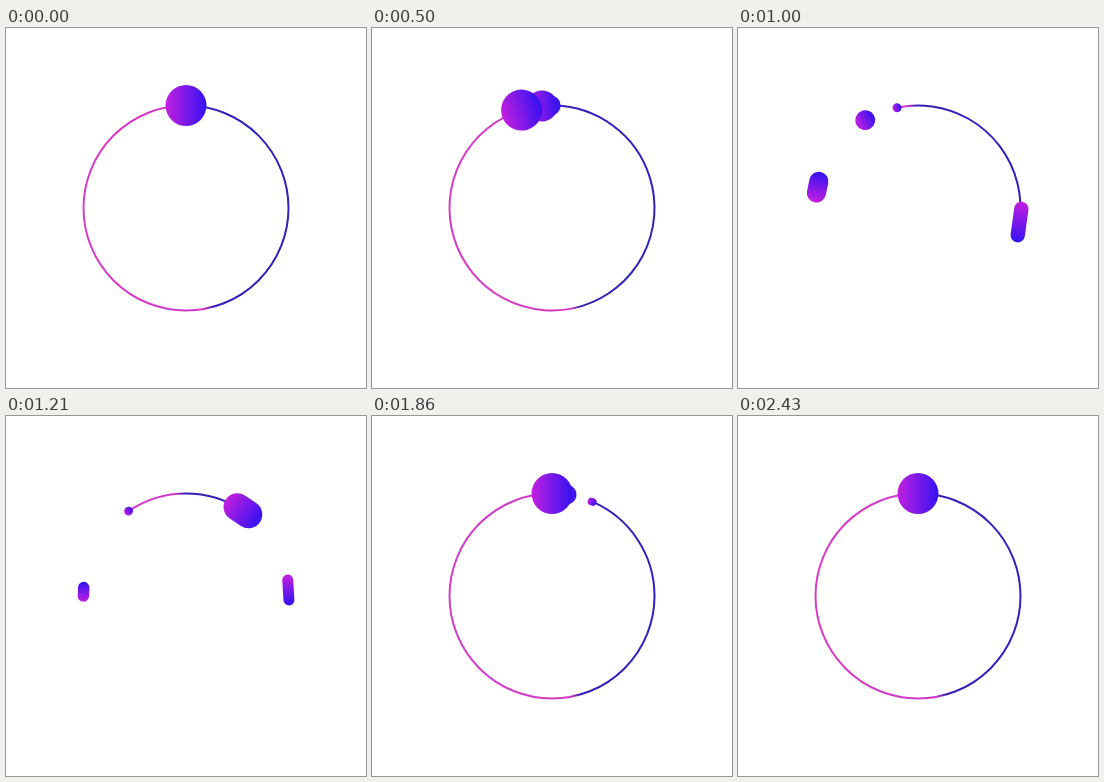
Recreate the animation shown at these times as an HTML page with a canvas. Size 360 by 360 pixels, loop 2.5 s.

```html
<!DOCTYPE html>
<html lang="en">
<head>
<meta charset="utf-8">
<title>Ring loader</title>
<style>
  html, body { margin: 0; width: 100%; height: 100%; overflow: hidden; background: #fff; }
  canvas { display: block; width: 100vw; height: 100vh; }
</style>
</head>
<body>
<canvas id="stage" width="360" height="360"></canvas>
<script>
const ctx = document.getElementById('stage').getContext('2d');
const LOOP = 2500, TRAVEL = 1850, STAGGER = 190;
const CENTER = 180, RADIUS = 102.5, TURN = Math.PI * 2;
const SIZES = [41, 31, 20, 9];

const ringPaint = ctx.createLinearGradient(90, 194.6, 290, 165.4);
ringPaint.addColorStop(0, '#d63cc6');
ringPaint.addColorStop(0.47, '#d038c8');
ringPaint.addColorStop(0.52, '#3420b4');
ringPaint.addColorStop(1, '#2c22c0');

const clamp = x => Math.min(1, Math.max(0, x));

// Symmetric cubic Bezier easing, solved by bisection
function ease(x) {
  const a = 0.88, b = 0.12;
  let low = 0, high = 1;
  for (let i = 0; i < 24; i++) {
    const u = (low + high) / 2, v = 1 - u;
    if (3 * u * v * v * a + 3 * u * u * v * b + u * u * u < x) low = u;
    else high = u;
  }
  return low * low * (3 - 2 * low);
}

// Balls get thinner while they are fast
function thickness(age) {
  const d = Math.min(1, Math.abs(age - TRAVEL / 2 - 75) / 425);
  return 1 - 0.65 * Math.cos(d * Math.PI / 2) ** 2;
}

function drawArc(from, to) {
  if (to <= from) return;
  const top = -Math.PI / 2;
  ctx.beginPath();
  ctx.arc(CENTER, CENTER, RADIUS, top - from * TURN, top - to * TURN, true);
  ctx.stroke();
}

function drawBall(size, progress, scale) {
  const height = size * scale;
  const paint = ctx.createLinearGradient(-size / 2, 0, size / 2, 0);
  paint.addColorStop(0, '#c31fdf');
  paint.addColorStop(1, '#3312f2');
  ctx.save();
  ctx.translate(CENTER, CENTER);
  ctx.rotate(-progress * TURN);
  ctx.translate(0, -RADIUS);
  ctx.fillStyle = paint;
  ctx.beginPath();
  ctx.roundRect(-size / 2, -height / 2, size, height, height / 2);
  ctx.fill();
  ctx.restore();
}

function draw(time) {
  const balls = SIZES.map((size, i) => {
    const age = time - i * STAGGER;
    return { size, progress: ease(clamp(age / TRAVEL)), scale: thickness(age) };
  });

  ctx.clearRect(0, 0, 360, 360);
  ctx.lineWidth = 2;
  ctx.strokeStyle = ringPaint;
  // The first ball erases the ring, the last one redraws it
  drawArc(balls[0].progress, 1);
  drawArc(0, balls[3].progress);
  balls.reverse().forEach(b => drawBall(b.size, b.progress, b.scale));
}

function tick() {
  draw(performance.now() % LOOP);
  requestAnimationFrame(tick);
}
tick();
</script>
</body>
</html>
```
